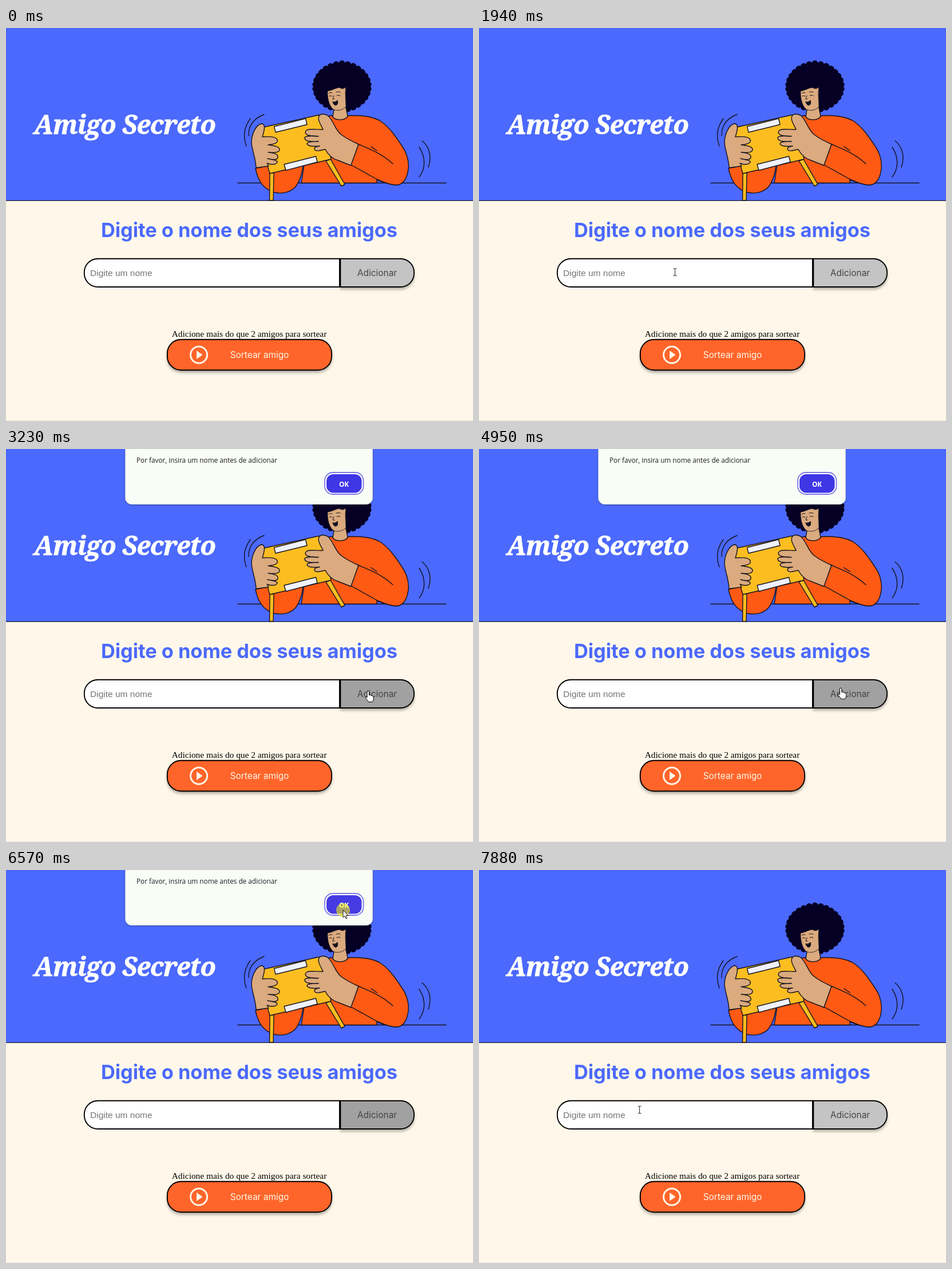
These frames come from a looping animation (816 by 686 pixels, 8 s). An HTML page:

```html
<!DOCTYPE html>
<html lang="pt-BR">
<head>
<meta charset="utf-8">
<title>Amigo Secreto</title>
<style>
  html, body { margin: 0; width: 100%; height: 100%; overflow: hidden; background: #fff8ea; }
  svg { display: block; width: 816px; height: 686px; }
  text { font-optical-sizing: none; white-space: pre; }
  .inter { font-family: Inter, sans-serif; }
  .title { font: italic 700 45px "Noto Serif", serif; letter-spacing: -0.8px; fill: #fff; stroke: #fff; stroke-width: .8; }
  .heading { font-size: 34.3px; font-weight: 700; fill: #4b69fd; }
  .label { font-size: 15.45px; }
  .hint { font: 15.5px "Liberation Sans", Arial, sans-serif; fill: #757575; }
  .note { font: 15.4px "Liberation Serif", "Times New Roman", serif; }
  .dialog { font: 11.75px "Open Sans", sans-serif; fill: #1d1d22; }
  .ok { font: 700 11.8px "Open Sans", sans-serif; fill: #fff; }
  .ink { stroke: #14131f; stroke-width: 1.4; stroke-linejoin: round; stroke-linecap: round; }
  .line { fill: none; }
  .skin { fill: #dbaa7e; }
  .cloth { fill: #ff5a14; }
  .board { fill: #fcbd20; }
  .strip { fill: #eff2fa; }
  .box { stroke: #000; stroke-width: 1.9; }
</style>
</head>
<body>
<svg viewBox="0 0 816 686">
  <defs>
    <filter id="shadow" x="-10%" y="-20%" width="120%" height="160%">
      <feDropShadow dx="0" dy="3.8" stdDeviation="1.9" flood-opacity=".28"/>
    </filter>
    <filter id="soft" x="-5%" y="-10%" width="110%" height="130%">
      <feDropShadow dx="0" dy="1" stdDeviation="1.2" flood-opacity=".35"/>
    </filter>
  </defs>

  <rect width="816" height="686" fill="#fff8ea"/>
  <rect width="816" height="301" fill="#4b69fd"/>
  <rect y="300.8" width="816" height="1.1" fill="#0c0f20"/>
  <rect y="685" width="816" height="1" fill="#e9e5dc"/>
  <text class="title" x="207.5" y="185" text-anchor="middle">Amigo Secreto</text>

  <g class="ink">
    <path class="line" d="M405 270.5H769"/>
    <path class="line" d="M427 158C416 173 414 190 420 206M451 151C434 157 423 170 424 188"/>
    <path class="line" d="M722 208C733 225 734 244 722 260M727 197C741 208 744 227 738 243"/>

    <!-- sweater and head -->
    <path class="cloth" d="M558 154L571 153C577 162 592 162 598 153C620 152 638 154 652 161C670 172 682 191 692 206C701 219 704 232 703 245C701 264 693 275 680 274C668 273 656 268 648 265V270.5H516L522 232Z"/>
    <path id="hair" fill="#050024" stroke="#050024" stroke-width="1"/>
    <path class="skin" d="M574 136L571 155C576 162 592 162 597 154L593 134Z"/>
    <path class="skin" stroke-width=".8" d="M562 110C570 109 577 104 583 104C587 107 591 106 594 103C592 116 594 127 594 137C590 143 580 145 574 143C566 140 561 124 562 110Z"/>
    <g stroke-width="1">
      <path class="line" d="M564 114Q567 111 570 113M577 112Q581 110 584 112M565 119Q567 117 570 119M578 118Q581 116 584 118M573 118L571 124H574"/>
      <path fill="#14131f" d="M571 129Q576 130 579 126Q581 134 576 135Q572 134 571 129Z"/>
    </g>

    <!-- box with legs -->
    <path class="cloth" d="M436 245L460 240L519 240C517 258 512 269 506 277C497 287 482 290 469 287C449 281 440 266 436 245Z"/>
    <path class="board" d="M461 253H468L467 301H460.5Z"/>
    <path class="board" d="M559 232L567 229L592 273L586 276Z"/>
    <path class="board" d="M446 174L546 152Q551 151 552 156L568 229L461 254L440 184Z"/>
    <path class="strip" d="M468.5 172L523.5 158L526 168.500L471 182Z"/>
    <path class="strip" d="M486 238L541.5 224L544 234L489 248.5Z"/>

    <!-- hands -->
    <path class="skin" d="M437 244C436 226 430 214 429 200C429 186 436 170 446 167C453 167 452 175 450 183L448 190C460 189 472 190 474 195C476 201 468 203 458 204C468 205 478 207 478 212C478 218 468 218 458 217C468 218 476 220 475 226C474 231 466 230 457 228C465 230 475 231 474 234C472 239 462 239 456 236L459 241Z"/>
    <path class="skin" d="M616 203C605 198 595 193 587 187C575 180 572 159 561 152C552 148 546 151 546 158C547 166 552 172 554 177C545 178 533 175 526 178C520 182 524 187 532 188L546 189C536 189 525 187 522 191C521 197 530 199 546 198C538 198 526 198 526 202C527 207 538 207 548 206C541 207 537 209 540 213C545 217 552 212 558 212C563 222 572 229 580 231L603 240Z"/>
    <path class="cloth" d="M676 237C655 218 635 211 616 203L603 239L648 264C658 268 668 273 680 274" stroke="none"/>
    <path class="line" d="M676 237C655 218 635 211 616 203L603 239L648 264C658 268 668 273 680 274M638 207L648 214"/>
  </g>

  <!-- form -->
  <text class="inter heading" x="425" y="364.700" text-anchor="middle">Digite o nome dos seus amigos</text>
  <path class="box" fill="#fff" d="M583 402.7H160.500A23.700 23.700 0 0 0 136.800 426.400V428.300A23.700 23.700 0 0 0 160.500 452H583Z"/>
  <path id="add" class="box" filter="url(#shadow)" d="M584.3 402.7H689.300A23.700 23.700 0 0 1 713 426.400V428.300A23.700 23.700 0 0 1 689.300 452H584.3Z"/>
  <path class="box" d="M583 402V453"/>
  <text class="hint" x="147" y="432.600">Digite um nome</text>
  <text class="inter label" x="648.5" y="432.800" text-anchor="middle" fill="#444">Adicionar</text>
  <text class="note" x="425" y="539" text-anchor="middle">Adicione mais do que 2 amigos para sortear</text>
  <rect class="box" filter="url(#shadow)" x="281.8" y="543.8" width="287.2" height="53.4" rx="24" fill="#ff652b"/>
  <circle cx="337" cy="570.5" r="14.5" fill="none" stroke="#fff8ea" stroke-width="3"/>
  <path fill="#fff8ea" d="M333 563L343.5 570.5L333 578Z"/>
  <text class="inter label" x="443" y="576" text-anchor="middle" fill="#fff8ea">Sortear amigo</text>

  <g id="dialog">
    <rect filter="url(#soft)" x="208.5" y="-20" width="432" height="116.5" rx="11" fill="#f9fdf6" stroke="#c3cfdc" stroke-width=".8"/>
    <text class="dialog" x="228" y="24">Por favor, insira um nome antes de adicionar</text>
    <rect x="557" y="41" width="67.5" height="38" rx="14" fill="#fff" stroke="#7d77e6" stroke-width="1.8"/>
    <rect id="ok" x="560" y="44" width="61.5" height="32.5" rx="12"/>
    <text class="ok" x="590.5" y="65.5" text-anchor="middle">OK</text>
  </g>

  <g id="pointer" stroke-linejoin="round">
    <circle id="halo" r="12" fill="#ff0" fill-opacity=".55"/>
    <path id="arrow" fill="#fff" stroke="#000" stroke-width=".9" d="M0 0V13L3 10.3L5 15L7 14.2L5 9.6H9Z"/>
    <path id="hand" fill="#fff" stroke="#000" d="M-2 1.5a1.7 1.7 0 0 1 3.4 0V7q3-1 3.2.8q2.4-.6 2.7 1q2-.2 2 1.7V13q0 4-2.3 6H.5Q-1 16.5-4.6 12.4q-.8-2.6 1.2-2.2L-2 11.5Z"/>
    <path id="beam" fill="none" stroke="#333" stroke-width="1.1" d="M-3-6.5Q0-6.5 0-5Q0-6.5 3-6.5M0-5V5M-3 6.5Q0 6.5 0 5Q0 6.5 3 6.5"/>
  </g>
</svg>
<script>
const LOOP = 8000;
const el = id => document.getElementById(id);
const show = (id, on) => el(id).setAttribute('visibility', on ? 'visible' : 'hidden');

// Pointer moves: start, end, number of steps, easing power, path
const moves = [
  [460, 1230, 12, 0.9, [[822, 666], [690, 600], [550, 528], [410, 475], [313, 451]]],
  [1300, 2080, 12, 1, [[313, 451], [268, 466], [228, 473], [243, 461], [292, 438], [342.5, 426], [371, 426]]],
  [2150, 2500, 6, 1, [[371, 426], [470, 428], [580, 427], [633, 422.5]]],
  [4950, 5720, 12, 1.25, [[633, 422.5], [606.5, 219]]],
  [5790, 6430, 10, 0.9, [[606.5, 219], [598, 140], [589, 70]]],
  [7040, 7810, 12, 1, [[589, 70], [515, 150], [425, 262], [335, 365], [285, 410.5]]],
  [7880, 7881, 1, 1, [[285, 410.5], [280.5, 418.5]]]
];

function spline(points, u) {
  const last = points.length - 1;
  const i = Math.min(last - 1, Math.floor(u * last));
  const f = u * last - i;
  const at = k => points[Math.max(0, Math.min(last, k))];
  return [0, 1].map(axis => {
    const [a, b, c, d] = [i - 1, i, i + 1, i + 2].map(k => at(k)[axis]);
    return b + f / 2 * (c - a + f * (2 * a - 5 * b + 4 * c - d + f * (3 * (b - c) + d - a)));
  });
}

function pointerAt(t) {
  const move = moves.filter(m => t >= m[0]).pop();
  if (!move) return null;
  const [start, end, steps, power, path] = move;
  const step = Math.floor((t - start) / (end - start) * (steps - 1) + 0.001);
  const u = Math.min(1, (step + 1) / steps);
  return spline(path, u ** power);
}

function dialogOpacity(t) {
  if (t < 3090 || t >= 6770) return 0;
  if (t < 3160) return 0.5;
  if (t < 3230) return 0.85;
  return t < 6700 ? 1 : 0.5;
}

function pointerKind(x, y, open) {
  if (open) return y < 96 ? 'arrow' : 'hand';
  if (y < 402 || y > 453 || x < 137 || x > 713) return 'arrow';
  return x < 584 ? 'beam' : 'hand';
}

function draw(t) {
  const pos = pointerAt(t);
  const opacity = dialogOpacity(t);
  const open = opacity > 0 && t < 6700;
  const overAdd = open || (pos && pos[0] > 584 && pos[1] > 402 && pos[1] < 453);
  el('add').setAttribute('fill', overAdd ? '#a1a1a1' : '#c4c4c4');
  el('dialog').setAttribute('opacity', opacity);
  const overOk = pos && pos[1] < 77 && open;
  el('ok').setAttribute('fill', overOk ? '#463be3' : '#3f36e6');

  const kind = pos && pointerKind(...pos, open);
  for (const id of ['arrow', 'hand', 'beam']) show(id, id === kind);
  show('halo', (t >= 2960 && t < 3160) || (t >= 6570 && t < 6700));
  if (pos) el('pointer').setAttribute('transform', `translate(${pos[0]} ${pos[1]})`);
}

function curls(cx, cy, rx, ry, count) {
  let d = '';
  for (let k = 0; k <= count; k++) {
    const a = k / count * Math.PI * 2;
    d += (k ? 'A5.2 5.2 0 0 1 ' : 'M') + (cx + rx * Math.cos(a)).toFixed(1) + ' ' + (cy + ry * Math.sin(a)).toFixed(1);
  }
  return d + 'Z';
}

el('hair').setAttribute('d', curls(587, 102.5, 49.5, 40.5, 30));
const origin = performance.now();
function tick() {
  draw((performance.now() - origin) % LOOP);
  requestAnimationFrame(tick);
}
draw(0);
requestAnimationFrame(tick);
</script>
</body>
</html>
```
